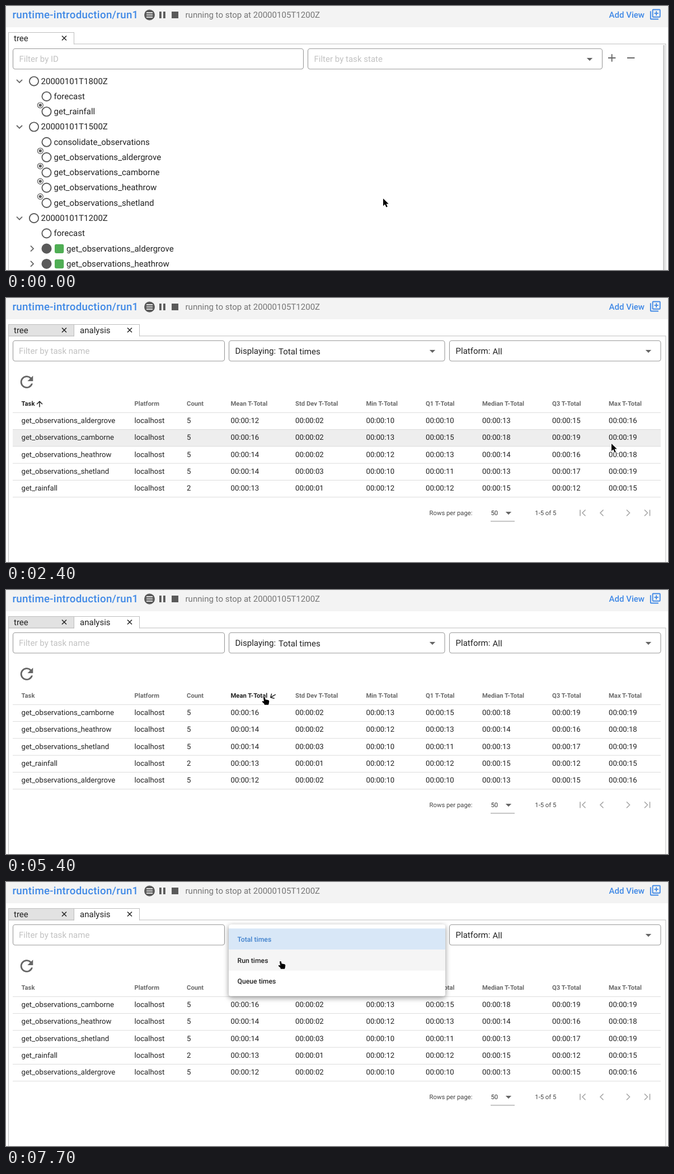
An HTML page for the animation above (8 s loop, 1183 by 473 pixels).

```html
<!DOCTYPE html>
<html lang="en">
<head>
<meta charset="utf-8">
<title>Workflow analysis view</title>
<style>
html, body { margin: 0; width: 100%; height: 100%; overflow: hidden; background: #fff; }
svg { display: block; width: 1183px; height: 473px; font-family: Roboto, sans-serif; text-rendering: geometricPrecision; }
text { white-space: pre; }
.pop { filter: drop-shadow(0 4px 5px rgba(0,0,0,.25)) drop-shadow(0 1px 5px rgba(0,0,0,.18)); }
</style>
</head>
<body>
<svg id="stage" viewBox="0 0 1183 473"></svg>
<script>
const LOOP = 8000, STEP = 100;
const INK = '#222', GREY = '#5a5a5a', BLUE = '#4089e6', LINE = '#9a9a9a';
const stage = document.getElementById('stage');

// Drawing helpers; baselines sit on whole pixels
const text = (x, y, s, size = 15.04, fill = INK, extra = '') =>
  `<text x="${x}" y="${Math.round(y)}" font-size="${size}" fill="${fill}" ${extra}>${s}</text>`;
const medium = 'font-weight="500"', bold = 'font-weight="700"';
const rect = (x, y, w, h, fill, extra = '') =>
  `<rect x="${x}" y="${y}" width="${w}" height="${h}" fill="${fill}" ${extra}/>`;
const fillPath = (d, fill, extra = '') => `<path d="${d}" fill="${fill}" ${extra}/>`;
const stroke = (d, color = GREY, w = 1.8, extra = '') =>
  `<path d="${d}" fill="none" stroke="${color}" stroke-width="${w}" ${extra}/>`;
const circle = (x, y, r, fill, edge = 'none', w = 0) =>
  `<circle cx="${x}" cy="${y}" r="${r}" fill="${fill}" stroke="${edge}" stroke-width="${w}"/>`;
const at = (x, y, body, extra = '') => `<g transform="translate(${x} ${y}) ${extra}">${body}</g>`;
const caret = (x, y) => fillPath(`M${x - 5.2},${y}h10.4l-5.2,5.2z`, '#666');
const cross = (x, y) => stroke(`M${x - 4},${y - 4}l8,8m0,-8l-8,8`, INK, 1.5);
const field = (x, x2, edge = LINE) =>
  rect(x + .5, 76.5, x2 - x - 1, 36.5, '#fff', `rx="4" stroke="${edge}" stroke-width="1.1"`);

// Pointer track: time, x, y, and whether the move only slows down
const TRACK = [
  [0, 674, 345], [900, 1111, 25], [1200, 1111, 25], [1900, 1084, 260], [2100, 1084, 260],
  [2200, 1082, 261], [3100, 1082, 261], [3200, 1001, 262], [3700, 507, 247, true], [3800, 507, 247],
  [4300, 462, 192], [5600, 462, 192], [6300, 490, 88], [7000, 490, 88], [7500, 491, 142], [LOOP, 491, 142]
];

function pointerAt(t) {
  const i = Math.max(1, TRACK.findIndex(k => k[0] >= t));
  const [t0, x0, y0] = TRACK[i - 1], [t1, x1, y1, out] = TRACK[i];
  const u = (t - t0) / (t1 - t0);
  const e = out ? 1 - (1 - u) ** 1.6 : u * u * (3 - 2 * u);
  return { x: x0 + (x1 - x0) * e, y: y0 + (y1 - y0) * e };
}

const ramp = (t, from, to) => Math.min(1, Math.max(0, (t - from) / (to - from)));
const inside = (p, x0, y0, x1, y1) => p.x >= x0 && p.x < x1 && p.y >= y0 && p.y < y1;

function pointer(p, hand) {
  const d = hand
    ? 'M-2.2,1.4C-2.2,-.6 .8,-.6 1.1,1.4L1.7,4.4L7.6,5.4Q9.4,5.9 9.2,8L8.6,11.6L7.8,14.2H-.2L-.7,12.2L-4.6,8.7Q-4.6,6.9 -2.8,7.1L-1,8Z'
    : 'M0,0V14L3.3,10.9L5.8,16.4L8.2,15.3L5.8,10H10.2Z';
  return at(p.x, p.y, fillPath(d, '#000', 'stroke="#fff" stroke-width="1.4" paint-order="stroke"'),
    hand ? 'scale(.9 .97)' : 'scale(.95)');
}

const ADD = 'M6,-1H3V2H1V-1H-2V-3H1V-6H3V-3H6M8,-8V4H-4V-8H8M8,-10H-4Q-6,-10 -6,-8V4Q-6,6 -4,6H8Q10,6 10,4V-8Q10,-10 8,-10M-8,-6H-10V8Q-10,10 -8,10H6V8H-8Z';

function header() {
  return rect(0, 0, 1183, 38, '#f3f3f3') +
    text(11.5, 22, 'runtime-introduction/run1', 18.8, BLUE, medium + ' letter-spacing=".27"') +
    circle(256.5, 16, 9.5, GREY) + stroke('M251,12.2h11m-11,3.8h11m-11,3.8h11', '#f3f3f3', 1.7) +
    rect(274, 10, 3.8, 12, GREY) + rect(281, 10, 3.8, 12, GREY) + rect(296, 10, 12, 12, GREY) +
    text(320.5, 21, 'running to stop at 20000105T1200Z', 15.04, '#757575') +
    text(1077.5, 21, 'Add View', 15.04, BLUE, medium) +
    at(1160.3, 15, fillPath(ADD, BLUE), 'scale(.94)');
}

function tabs(two) {
  let s = rect(4.5, 68, 1174.5, 420, '#fff', 'stroke="#bdbdbd"') +
    rect(4.5, 47.5, 117, 20.5, two ? '#e2e2e2' : '#fff', 'stroke="#bdbdbd"');
  if (two) s += rect(121.5, 47.5, 117, 20.5, '#fff', 'stroke="#bdbdbd"') +
    rect(122, 67, 116, 2, '#fff') + text(132, 62.5, 'analysis') + cross(221, 57.5);
  else s += rect(5, 67, 116, 2, '#fff');
  return s + text(14, 62.5, 'tree') + cross(104, 57.5);
}

// Tree rows. Prefix: # cycle, @ running cycle, * held, . running, > finished job, ~ running job
function treeRows(t) {
  const sites = ['aldergrove', 'camborne', 'heathrow', 'shetland'].map(n => 'get_observations_' + n);
  const join = 'consolidate_observations';
  const rows = ['#20000101T1800Z', ' forecast', '*get_rainfall', '#20000101T1500Z', ' ' + join,
    ...sites.map(n => '*' + n)];
  if (t < 500) rows.push('#20000101T1200Z');
  else rows.push('@20000101T1200Z', (t < 1400 ? '.' : '~') + join);
  rows.push(' forecast', '>' + sites[0], '>' + sites[2]);
  return rows.slice(0, 13);
}

function treeRow(row, i) {
  const y = 134.7 + 27.27 * i, kind = row[0];
  const cycle = '#@'.includes(kind), job = '>~'.includes(kind);
  const cx = cycle ? 50 : 72.5;
  let s = circle(cx, y, 8.1, kind == '>' ? GREY : '#fff', GREY, 1.9);
  if (cycle) s += stroke(`M19,${y - 2.5}l5,5l5,-5`, '#666');
  if ('@.~'.includes(kind)) s += circle(cx, y, 1.4, GREY);
  if (kind == '*') s += circle(61.3, y - 11.5, 5, '#fff', GREY, 1.2) + circle(61.3, y - 11.5, 2.7, GREY);
  if (job) s += stroke(`M44,${y - 5}l5,5l-5,5`, '#666') +
    rect(87, y - 8, 16.3, 16.3, kind == '>' ? '#4fae54' : '#6bd1be', 'rx="3"');
  return s + text(cycle ? 62.5 : job ? 108 : 85.5, y + 4.9, row.slice(1));
}

function treeView(t) {
  return tabs(false) + rect(1174.3, 70, 2.6, 403, '#c6c6c6') + field(12, 532) + field(539, 1066) +
    text(23.5, 100, 'Filter by ID', 15.04, '#c2c2c2') +
    text(550.5, 100, 'Filter by task state', 15.04, '#c2c2c2') + caret(1043, 93) +
    stroke('M1076,93h13.4m-6.7,-6.7v13.4M1110,93h13.4', '#666', 1.9) +
    treeRows(t).map(treeRow).join('');
}

const MENU = [
  ['Tree', fillPath('M-9,-9h6v4h-6zM3,-2h6v4h-6zM3,5h6v4h-6zM1,1h-6v5h6v2h-8v-11h2v2h6z', '#666')],
  ['Table', stroke('M-8,-6.5h16v13h-16zM-8,-4.7h16M-8,1h16M0,-5v11.5', '#666', 1.8)],
  ['Graph', stroke('M0,-5.5v5M-1,0l-4.6,6M1,0l4.6,6', '#666', 1.3) +
    [[0, -7.5], [0, 0], [-7, 7], [7, 7]].map(p => circle(...p, 2.1, '#fff', '#666', 1.5)).join('')],
  ['Log', stroke('M-5.5,-9.5h8l5.5,5.5v10h-13.5zM2.2,-9.5v6h5.8M-2.5,-.3h7.5M-2.5,3h5M-9,-6v16h13', '#666', 1.6)],
  ['Analysis', stroke('M-9,-9v17.5h18M-8,6.5l6,-8l4.5,3.5l7,-9', '#666', 1.5)],
  ['SimpleTree', fillPath('M-1.4,9v-5c-4,1.6 -7,-.6 -6,-4c-1,-5 2,-6 3.5,-7c2.6,-3 7,-2 8,1c3.3,1 4.4,5 3,7c-.5,3 -3,4 -5.7,3v5z', '#666')]
];

function addMenu(p, show) {
  if (!show) return '';
  const items = MENU.map(([name, icon], i) => {
    const y = 53.3 + 53 * i;
    const over = inside(p, 986, y - 26.5, 1176, y + 26.5);
    return (over ? rect(986, y - 26.5, 190, 53, '#f4f4f4') : '') +
      at(1028, y, icon, 'scale(.96)') + text(1069, y + 5, name);
  }).join('');
  const k = .6 + .4 * show;
  return `<g class="pop" opacity="${show}" transform="translate(${1176 * (1 - k)} ${27 * (1 - k)}) scale(${k})">` +
    rect(986, 27, 190, 318, '#fff', 'rx="4"') + items + '</g>';
}

// Table: name, count, then seconds per statistic
const DATA = {
  a: 'get_observations_aldergrove 5 12 02 10 10 13 15 16',
  c: 'get_observations_camborne 5 16 02 13 15 18 19 19',
  h: 'get_observations_heathrow 5 14 02 12 13 14 16 18',
  s: 'get_observations_shetland 5 14 03 10 11 13 17 19',
  r: 'get_rainfall 2 13 01 12 12 15 12 15'
};
const COLS = [27.5, 229.5, 323, 401.5, 517, 643.5, 750, 851, 976, 1077];
const HEADS = ['Task', 'Platform', 'Count',
  ...['Mean', 'Std Dev', 'Min', 'Q1', 'Median', 'Q3', 'Max'].map(n => n + ' T-Total')];
const ROW = 30.3;

const sortArrow = (x, opacity, turn = 0) => opacity > 0
  ? at(x, 190, stroke('M0,5.6V-4.6M-5,.2L0,-4.8L5,.2', INK, 1.5, `opacity="${opacity}"`), `rotate(${turn})`) : '';

function table(t, p) {
  const overMean = inside(p, 390, 172, 505, 205);
  const taskFade = 1 - ramp(t, 4500, 4700);
  const meanFade = t < 4500 ? (overMean ? .5 : 0) : .6 + .4 * ramp(t, 4500, 4700);
  const order = t < 4500 ? 'achsr' : t < 5300 ? 'arhsc' : 'chsra';
  let s = HEADS.map((h, i) => {
    const dark = i == 0 ? taskFade > .3 : i == 3 && (t >= 4500 || overMean);
    return text(COLS[i], 193, h, 11.28, dark ? INK : '#6b6b6b', bold);
  }).join('');
  s += sortArrow(60, taskFade) + sortArrow(477, meanFade, -180 * ramp(t, 5200, 5500));
  [...order].forEach((key, i) => {
    const y = 205.3 + ROW * i;
    if (inside(p, 12, y, 1170, y + ROW)) s += rect(12, y, 1158, ROW, '#eeeeee');
    const [name, count, ...secs] = DATA[key].split(' ');
    s += [name, 'localhost', count, ...secs.map(n => '00:00:' + n)]
      .map((v, j) => text(COLS[j], y + 18.7, v, 13.16)).join('');
  });
  for (let i = 0; i < 6; i++) s += rect(12, 204.8 + ROW * i, 1158, 1, '#dcdcdc');
  return s;
}

function footer() {
  return text(756.6, 389, 'Rows per page:', 11.28, '#444') + text(866.5, 389, '50', 11.28, '#333') +
    caret(898, 383) + rect(866, 399.5, 43, 1, '#8c8c8c') + text(945.3, 389, '1-5 of 5', 11.28, '#444') +
    stroke('M1026,379.5v11m9.5,-11l-5.5,5.5l5.5,5.5M1067.5,379.5l-5.5,5.5l5.5,5.5M1109,379.5l5.5,5.5l-5.5,5.5M1141,379.5l5.5,5.5l-5.5,5.5m9.5,-11v11', '#a6a6a6', 1.6);
}

const REFRESH = 'M5.65,-5.65A8,8 0 1 0 7.73,2H5.65A6,6 0 1 1 4.22,-4.22L1,-1H8V-8Z';

function analysisView(t, p) {
  const over = inside(p, 398, 76, 784, 113);
  return tabs(true) + field(12, 391) + field(398, 784.5, over ? INK : LINE) + field(792, 1170.5) +
    text(23, 100, 'Filter by task name', 15.04, '#c2c2c2') +
    text(409.5, 100, 'Displaying:') + text(487, 101, 'Total times') + caret(762, 93) +
    text(803.5, 100, 'Platform:') + text(869.5, 101, 'All') + caret(1148, 93) +
    at(37, 150.5, fillPath(REFRESH, '#666'), 'scale(1.41)') + table(t, p) + footer();
}

function timesMenu(p, show) {
  if (!show) return '';
  const items = ['Total times', 'Run times', 'Queue times'].map((name, i) => {
    const y = 83.3 + 37.8 * i;
    const tint = i == 0 ? '#d8e7f7' : inside(p, 398, y, 785, y + 37.8) ? '#f5f5f5' : '#fff';
    return rect(398, y, 387, 37.8, tint) + text(413.5, y + 23.6, name, 12.22, i ? INK : '#3f80cc', medium);
  }).join('');
  return `<g class="pop" opacity="${show}">` + rect(398, 76, 387, 128.5, '#fff', 'rx="4"') + items + '</g>';
}

function scene(t) {
  const p = pointerAt(t);
  const analysis = t >= 2200;
  const menu = ramp(t, 1000, 1300) * (1 - ramp(t, 2000, 2300));
  const times = ramp(t, 6600, 6900);
  const hand = analysis
    ? inside(p, 390, 172, 505, 205) || inside(p, 398, 76, 784, 113) || times > 0
    : inside(p, 1070, 0, 1175, 30) || (menu > .5 && inside(p, 986, 27, 1176, 345));
  return header() + (analysis ? analysisView(t, p) : treeView(t)) +
    addMenu(p, menu) + timesMenu(p, times) + pointer(p, hand);
}

// The screen refreshes ten times a second
let last = -1;
const start = performance.now();
function tick(now) {
  const step = Math.floor((Math.max(0, now - start) % LOOP) / STEP);
  if (step !== last) stage.innerHTML = scene((last = step) * STEP);
  requestAnimationFrame(tick);
}
tick(start);
</script>
</body>
</html>
```
